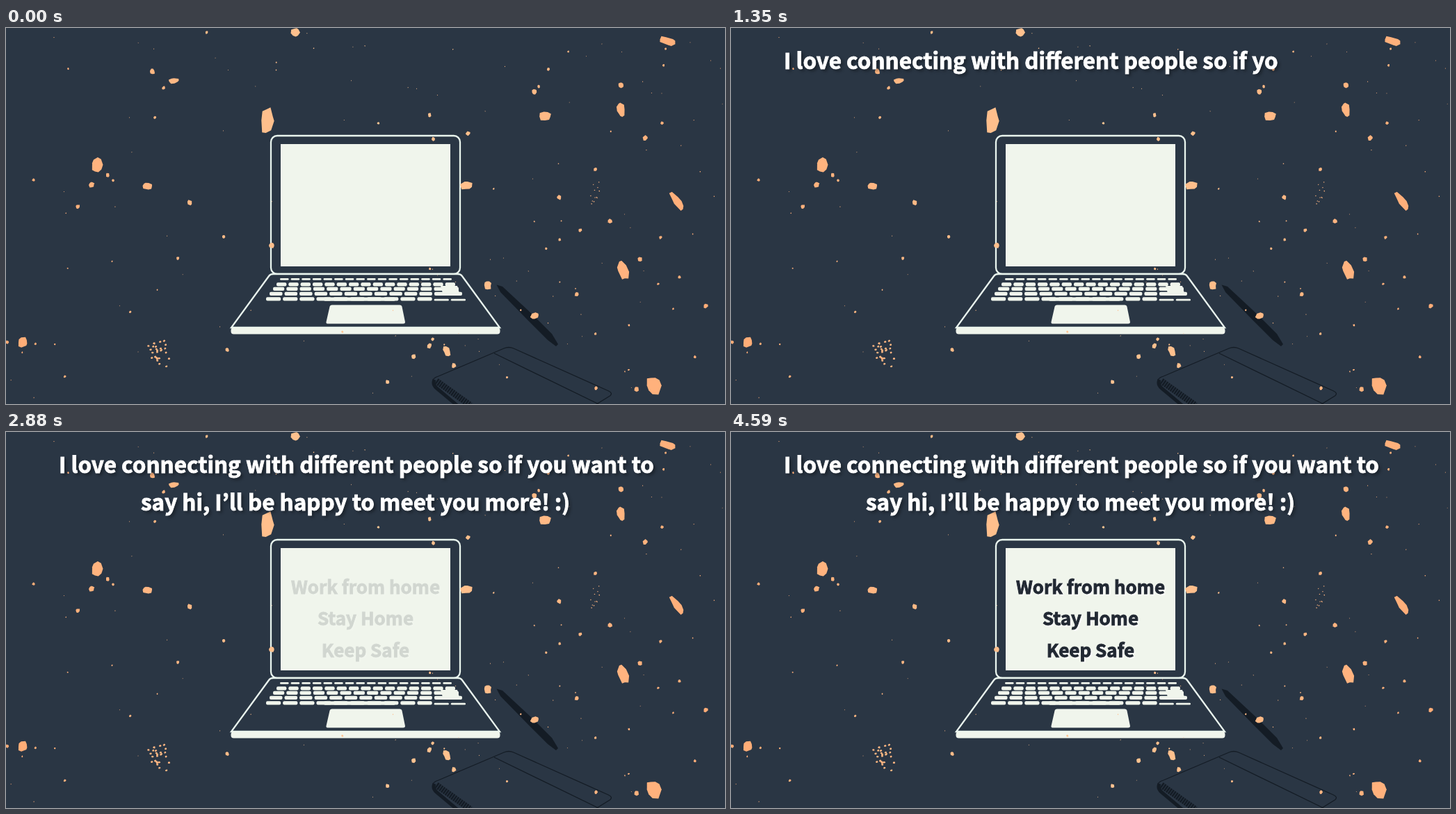
An HTML page that plays this animation: 1034x541 px, repeating every 4.65 s.

```html
<!DOCTYPE html>
<html lang="en">
<head>
<meta charset="utf-8">
<title>Work from home</title>
<style>
  html, body { margin: 0; width: 100%; height: 100%; overflow: hidden; background: #2a3644; }
  #stage { position: relative; width: 1034px; height: 541px; overflow: hidden; }
  svg { position: absolute; inset: 0; }
  .text {
    position: absolute; white-space: pre; line-height: 54px;
    font-family: "Noto Sans CJK JP", "Noto Sans CJK KR", "Noto Sans CJK SC", "Noto Sans", sans-serif;
    font-weight: 900; -webkit-text-stroke: .9px currentColor;
  }
  .title { color: #fff; font-size: 31.45px; text-shadow: 3px 3px 4px rgba(0, 0, 0, .4); }
  #line1 { left: 76px; top: 19px; }
  #line2 { left: 194px; top: 73px; }
  #note {
    left: 395px; top: 198.500px; width: 244px; text-align: center;
    font-size: 26px; line-height: 45.5px; color: #222933;
    text-shadow: 2px 2px 2px #fff;
  }
</style>
</head>
<body>
<div id="stage">
  <svg width="1034" height="541" viewBox="0 0 1034 541">
    <g fill="none" stroke="#141c25" stroke-width="1.3">
      <path d="M614 506Q616 503 622 501L716 461Q723 458 730 461L866 522Q873 525 869 529L848 542M702 468L852 541"/>
      <path d="M616 506Q613 513 619 518L650 544" stroke-width="5"/>
      <path d="M619 508L668 543" stroke-width="9" stroke-dasharray="2.5 1"/>
    </g>
    <path d="M705.500 369.500L714 372L758 413L785 440L794 455L791 458L779 449L752 422L711 380Z" fill="#141c25"/>
    <g fill="#2a3644" stroke="#e9f5ee" stroke-width="2.3">
      <rect x="381" y="155" width="272" height="199" rx="9"/>
      <path d="M384 354H650Q654 354 656 357L710 431H324L378 357Q380 354 384 354Z"/>
    </g>
    <g fill="#f0f5ec">
      <path d="M395 167H639V343H395Z"/>
      <rect x="323.500" y="431" width="387" height="9.600" rx="4"/>
      <path d="M469 398.500H566Q569 398.500 569.500 401L574 423Q574 425.500 571 425.500H463Q460 425.500 460.500 423L465.500 401Q466 398.500 469 398.500Z"/>
      <g id="keys"></g>
      <path d="M625 371H649L653 385H629Z"/>
    </g>
    <g id="flakes"></g>
  </svg>
  <div class="text title" id="line1"></div>
  <div class="text title" id="line2"></div>
  <div class="text" id="note">Work from home
Stay Home
Keep Safe</div>
</div>
<script>
const LOOP = 4650, CHAR_MS = 24;
const $ = id => document.getElementById(id);
const clamp = v => Math.max(0, Math.min(1, v));

let seed = 7;
const random = () => (seed = seed * 16807 % 2147483647) / 2147483647;
const spread = size => (random() + random() + random() - 1.5) * size;

function add(parent, tag, attrs) {
  const node = document.createElementNS("http://www.w3.org/2000/svg", tag);
  for (const name in attrs) node.setAttribute(name, attrs[name]);
  parent.append(node);
}

function key(x, y, width, height) {
  add($("keys"), "rect", { x, y, width, height, rx: Math.min(2, height / 2) });
}

// Rows grow wider and taller toward the viewer
for (let row = 0; row < 5; row++) {
  const left = 394 - 5 * row, right = 641 + 5 * row;
  const y = 360 + 6 * row + .2 * row * row;
  const height = Math.min(5.3, 2.8 + 2.4 * row);
  const pitch = (right - left + 3) / (16 - row);
  for (let x = left; x < right; x += pitch) {
    const low = row === 4 && x > 600;
    key(x, low ? y + 2.6 : y, pitch - 3, low ? 2.7 : height);
  }
}
key(457, 387.5, 103, 5.3);

// Flakes turn from pale peach in the middle to orange at the sides
function flake(x, y, w, h, tilt = 0) {
  const side = Math.abs(x - 517) / 517;
  const corners = Math.max(w, h) > 8 ? 9 : 6;
  const points = Array.from({ length: corners }, (_, i) => {
    const a = (i + random() * .6) / corners * 2 * Math.PI;
    const c = Math.cos(a), s = Math.sin(a);
    const reach = (.8 + random() * .3) / Math.pow(c ** 4 + s ** 4, .22);
    return `${(c * reach * w / 2).toFixed(1)},${(s * reach * h / 2).toFixed(1)}`;
  });
  add($("flakes"), "polygon", {
    points: points.join(" "),
    transform: `translate(${x} ${y}) rotate(${tilt})`,
    fill: `rgb(255 ${198 - 26 * side} ${148 - 30 * side})`
  });
}

// The most visible flakes: x, y, width, height, tilt
[
  [376, 133, 18, 38, 4], [952, 19, 24, 11, 15], [884, 117, 12, 21, -15], [775, 127, 18, 13],
  [132, 197, 16, 23, 20], [204, 227, 14, 10], [662, 227, 17, 11], [965, 249, 11, 30, -34],
  [887, 348, 15, 27, -18], [24, 452, 14, 14], [634, 465, 10, 16, -20], [932, 514, 21, 26],
  [241, 76, 14, 8, -10], [416, 6, 13, 13], [693, 370, 10, 12], [760, 414, 12, 8, -20]
].forEach(f => flake(...f));

// Fine dust with a few larger crumbs, leaving the screen clean
for (let i = 0; i < 170; i++) {
  const x = random() * 1034, y = random() * 541;
  const size = 1 + 7 * random() ** 4;
  if (x < 395 || x > 639 || y < 167 || y > 343) flake(x, y, size, size * 1.1);
}
for (let i = 0; i < 26; i++) flake(221 + spread(14), 468 + spread(18), 3.5, 3);
for (let i = 0; i < 12; i++) flake(845 + spread(9), 239 + spread(17), 1.6, 1.6);

const lines = [
  { node: $("line1"), start: 190, text: "I love connecting with different people so if you want to" },
  { node: $("line2"), start: 1676, text: "say hi, I’ll be happy to meet you more! :)" }
];

function draw() {
  const t = performance.now() % LOOP;
  for (const { node, start, text } of lines)
    node.textContent = text.slice(0, Math.max(0, Math.floor((t - start) / CHAR_MS)));
  $("note").style.opacity = clamp((t - 2747) / 917);
  requestAnimationFrame(draw);
}
draw();
</script>
</body>
</html>
```
